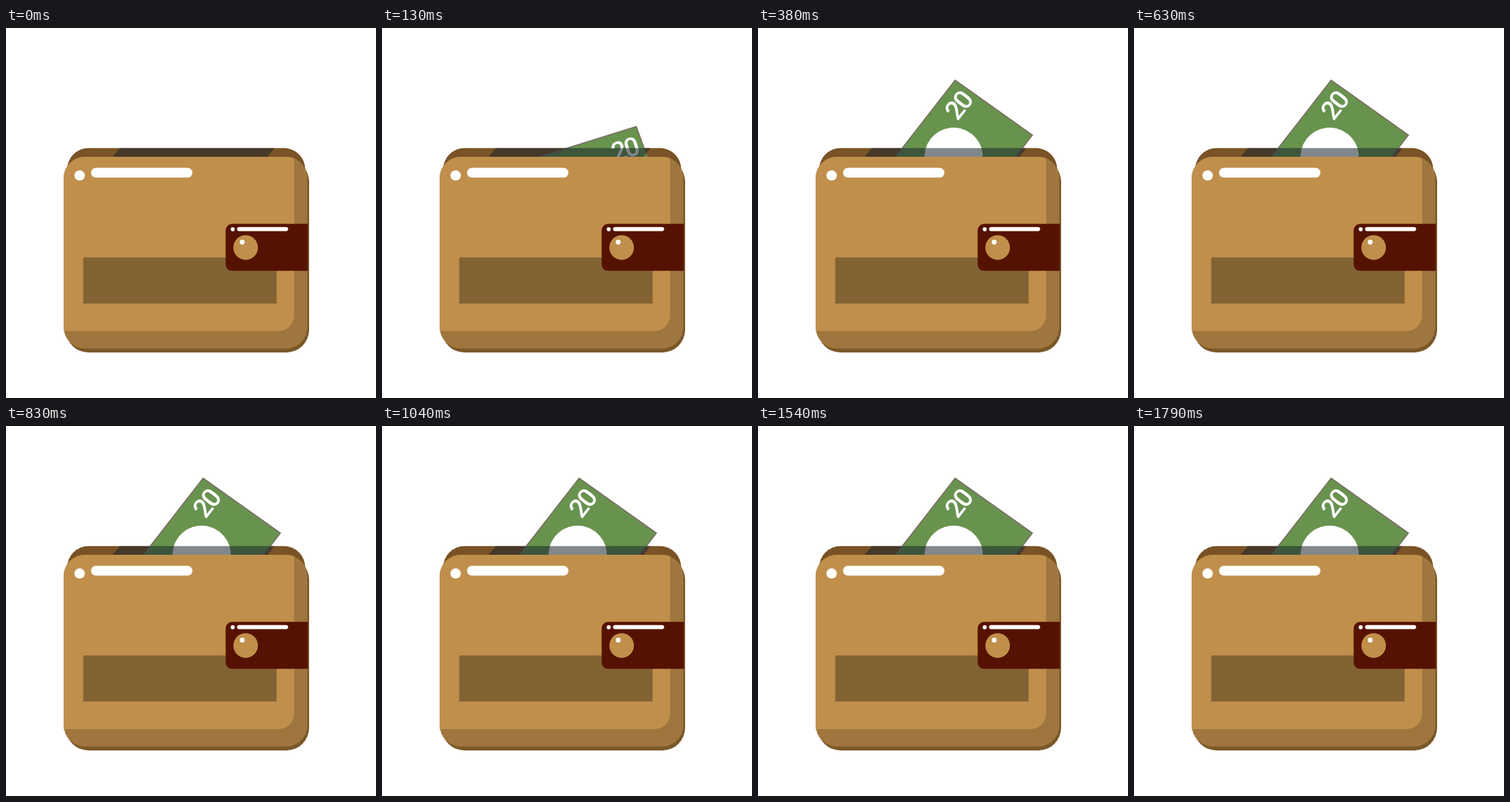
An HTML page with a canvas that plays this animation: 520x520 px, repeating every 1.83 s.

```html
<!DOCTYPE html>
<html lang="en">
<head>
<meta charset="utf-8">
<title>Wallet</title>
<style>
html, body { margin: 0; width: 100%; height: 100%; overflow: hidden; background: #fff; }
canvas { display: block; width: 520px; height: 520px; }
</style>
</head>
<body>
<canvas id="stage" width="520" height="520"></canvas>
<script>
const ctx = document.getElementById('stage').getContext('2d');
const LOOP = 1830, STEP = 1000 / 24, RISE_STEPS = 9;
const TAN = '#c08f4b', SIDE = '#9f763e', EDGE = '#7b5829', STRAP = '#561200';

function box(x1, y1, x2, y2, r, color) {
  ctx.fillStyle = color;
  ctx.beginPath();
  ctx.roundRect(x1, y1, x2 - x1, y2 - y1, r);
  ctx.fill();
}

function dot(x, y, r, color) {
  ctx.fillStyle = color;
  ctx.beginPath();
  ctx.arc(x, y, r, 0, Math.PI * 2);
  ctx.fill();
}

function poly(points) {
  ctx.beginPath();
  points.forEach(([x, y]) => ctx.lineTo(x, y));
  ctx.closePath();
}

const mix = (a, b, p) => a + (b - a) * p;

function drawBill(p) {
  ctx.save();
  ctx.translate(mix(304, 275, p), mix(248, 181, p));
  ctx.rotate(mix(0, -52.1, p) * Math.PI / 180);
  poly([[-86, -64.5], [86.2, -64.5], [92, 68.5], [-92, 70]]);
  ctx.fillStyle = '#67934e';
  ctx.fill();
  ctx.strokeStyle = '#7b6c61';
  ctx.lineWidth = 1.6;
  ctx.stroke();
  dot(0, 0, 41, '#fff');
  ctx.font = '500 37px Roboto, "Liberation Sans", sans-serif';
  ctx.letterSpacing = '-2.5px';
  ctx.textAlign = 'center';
  ctx.textBaseline = 'alphabetic';
  ctx.fillStyle = '#fff';
  ctx.fillText('20', 61, -26);
  ctx.restore();
}

function drawFront() {
  box(84, 184, 426, 456, 32, EDGE);
  box(81, 181, 423.5, 450.5, 30, SIDE);

  // Lit face, trimmed to the outline of the body
  ctx.save();
  ctx.beginPath();
  ctx.roundRect(81, 181, 342.5, 269.5, 30);
  ctx.clip();
  box(81, 181, 405, 426, [0, 0, 22, 0], TAN);
  ctx.restore();

  dot(103.5, 207.3, 7.3, '#fff');
  box(119.5, 196.5, 262, 210.2, 6.8, '#fff');
  box(108.5, 322.5, 380.3, 387.3, 0, '#836333');

  box(308.7, 275.3, 424.3, 341.3, [9, 0, 0, 9], STRAP);
  dot(318.6, 282.8, 2.9, '#fff');
  box(324.7, 279.7, 396.5, 285.5, 2.9, '#fff');
  dot(336.8, 308.6, 17.3, TAN);
  dot(332, 301, 3.4, '#fff');
}

function draw(t) {
  const p = Math.min(Math.floor((t + 5) / STEP), RISE_STEPS) / RISE_STEPS;
  ctx.fillStyle = '#fff';
  ctx.fillRect(0, 0, 520, 520);
  box(86, 168.7, 420.5, 300, [30, 30, 0, 0], '#795326');
  drawBill(p);
  poly([[160, 168.7], [377, 168.7], [367, 182], [149, 182]]);
  ctx.fillStyle = 'rgba(28, 38, 44, 0.55)';
  ctx.fill();
  drawFront();
}

const start = performance.now();
function tick() {
  draw((performance.now() - start) % LOOP);
  requestAnimationFrame(tick);
}
tick();
</script>
</body>
</html>
```
